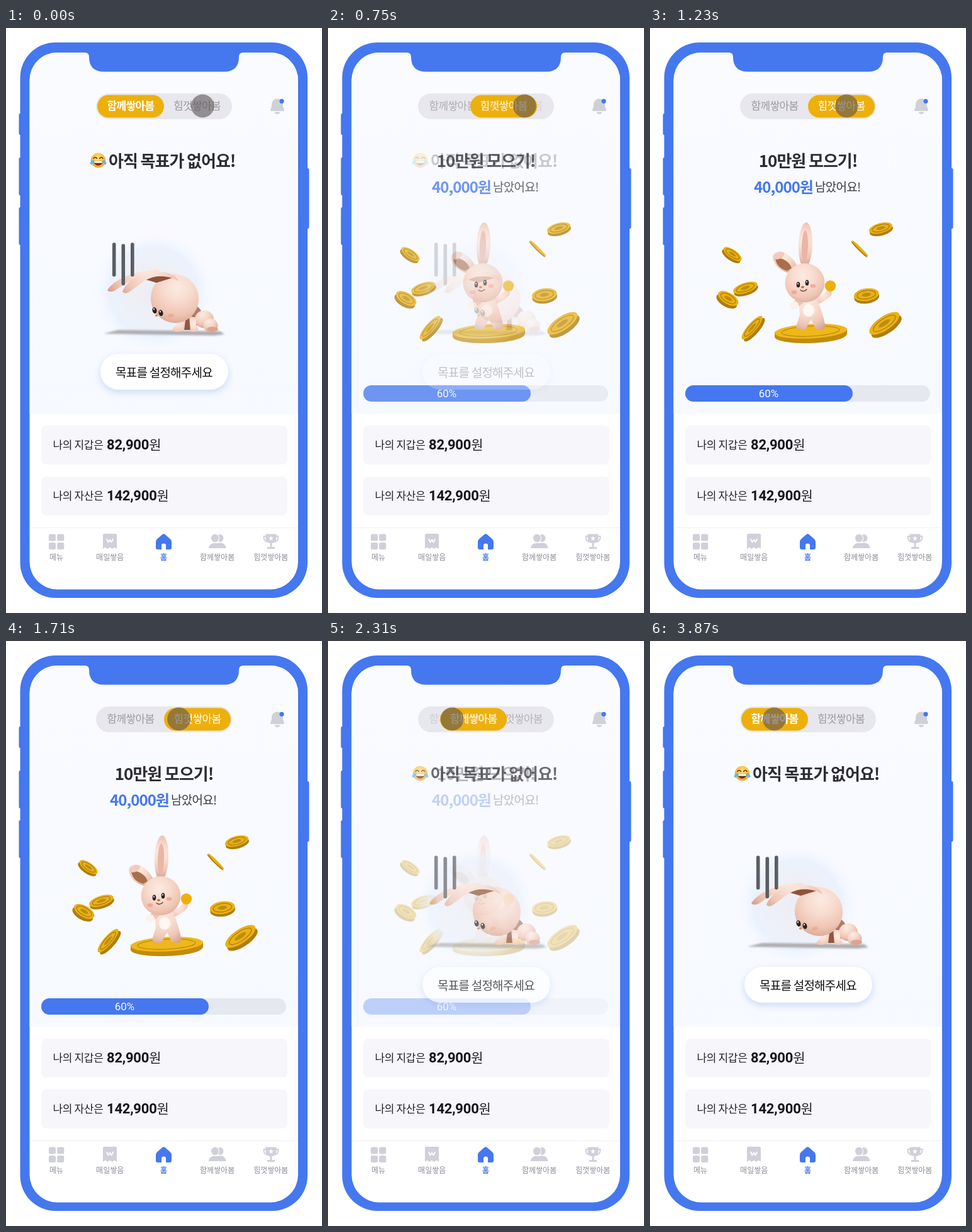
An HTML page with a canvas that plays this animation: 502 by 930 pixels, repeating every 3.9 s.

```html
<!DOCTYPE html>
<html lang="ko">
<head>
<meta charset="utf-8">
<title>저축 목표 화면</title>
<style>
html, body { margin: 0; width: 100%; height: 100%; overflow: hidden; background: #fff; }
canvas { display: block; width: 502px; height: 930px; }
</style>
</head>
<body>
<canvas id="stage"></canvas>
<script>
const W = 502, H = 930, LOOP = 3900;
const BLUE = '#4577ef', GOLD = '#edb00b', INK = '#2d2c33', GREY = '#9a9aa2', ICON = '#cfd0d9';
const KR = '"Noto Sans CJK KR", "Noto Sans CJK", "Noto Sans", sans-serif';
const NUM = 'Roboto, "Noto Sans CJK KR", sans-serif';
const TABS = ['함께쌓아봄', '힘껏쌓아봄'];
const dpr = window.devicePixelRatio || 1;

function setup(canvas) {
  canvas.width = W * dpr;
  canvas.height = H * dpr;
  const ctx = canvas.getContext('2d');
  ctx.scale(dpr, dpr);
  return ctx;
}

const stage = setup(document.getElementById('stage'));
let c = stage;

// Draws once into its own canvas so a whole scene can fade as one.
function layer(draw) {
  const canvas = document.createElement('canvas');
  c = setup(canvas);
  draw();
  c = stage;
  return canvas;
}

function box(x, y, w, h, r, fill) {
  c.fillStyle = fill;
  c.beginPath();
  c.roundRect(x, y, w, h, r);
  c.fill();
}

function oval(x, y, rx, ry, fill, deg = 0) {
  c.fillStyle = fill;
  c.beginPath();
  c.ellipse(x, y, rx, ry, deg * Math.PI / 180, 0, Math.PI * 2);
  c.fill();
}

function shape(d, fill) {
  c.fillStyle = fill;
  c.fill(new Path2D(d));
}

function line(d, color, width) {
  c.strokeStyle = color;
  c.lineWidth = width;
  c.lineCap = c.lineJoin = 'round';
  c.stroke(new Path2D(d));
}

function text(str, x, y, size, color, opt = {}) {
  const { weight = 400, align = 'left', track = -0.04, font = KR } = opt;
  c.font = `${weight} ${size}px ${font}`;
  c.letterSpacing = `${size * track}px`;
  c.textAlign = align;
  c.textBaseline = 'alphabetic';
  c.fillStyle = color;
  c.fillText(str, x, y);
}

function glow(x, y, r, ...stops) {
  const g = c.createRadialGradient(x, y, 0, x, y, r);
  stops.forEach((s, i) => g.addColorStop(i / (stops.length - 1), s));
  return g;
}

const skin = (x, y, r) => glow(x, y, r, '#fceae1', '#f8dccf', '#efc5b4', '#cf9a85');

function coin(x, y, rx, ry, deg, depth) {
  c.save();
  c.translate(x, y);
  c.rotate(deg * Math.PI / 180);
  oval(0, depth / 2, rx, ry, '#b07c0a');
  oval(0, -depth / 2, rx, ry, '#e9b114');
  if (ry > 4) {
    c.strokeStyle = '#a9790f';
    c.lineWidth = 1.2;
    c.beginPath();
    c.ellipse(0, -depth / 2, rx * .74, ry * .67, 0, 0, Math.PI * 2);
    c.stroke();
    oval(0, -depth / 2, rx * .38, ry * .3, '#bf8c10');
  }
  c.restore();
}

function laughFace(x, y) {
  oval(x, y, 11.8, 11.8, glow(x, y - 3, 15, '#ffe17a', '#fbc84a', '#ee9f30'));
  shape(`M${x - 7.5} ${y + 1} H${x + 7.5} C${x + 7} ${y + 10.5} ${x - 7} ${y + 10.5} ${x - 7.5} ${y + 1}Z`, '#6b3418');
  box(x - 6.5, y + 1, 13, 3, 1, '#fff');
  for (const s of [-1, 1]) {
    line(`M${x + s * 7.5} ${y - 3} Q${x + s * 5} ${y - 7} ${x + s * 2} ${y - 3}`, '#6b3418', 1.5);
    oval(x + s * 9.8, y + 3, 2.3, 4, '#5cbcec', s * -35);
  }
}

function sadRabbit() {
  oval(234, 419, 95, 89, glow(234, 419, 95, '#ececf2', '#eeeff5', '#eef0f7', '#ebf2fd', 'rgba(246,249,255,0)'));
  c.save();
  c.filter = 'blur(1.5px)';
  shape('M155 486 L178 480 L340 482 L347 487 L330 489Z', '#aeadb1');
  c.restore();

  // far ear and hind body
  shape('M161 417 C169 402 202 384 244 385 L238 393 C212 391 192 405 172 418 Q164 421 161 417Z', skin(222, 380, 75));
  oval(294, 458, 18, 18, '#b47b64');
  oval(315, 463, 15, 14, skin(312, 455, 24));
  oval(325, 473, 11.5, 11, skin(322, 466, 20));
  oval(328, 479, 9, 4, '#d9a591');

  // legs, with the shaded gap between them
  shape('M278 458 H300 L298 480 H282Z', '#8f5743');
  shape('M270 456 L286 458 L283 480 Q275 485 264 482 Q265 476 271 472Z', skin(273, 468, 23));
  shape('M291 458 L303 460 Q300 472 306 479 Q302 485 293 482Z', skin(298, 470, 21));

  oval(268, 430, 38, 39, skin(272, 412, 66), -20);
  shape('M218 399 C232 387 254 389 265 397 L239 405 L229 402Z', '#8f523a');
  shape('M185 419 C191 402 216 384 252 388 C264 390 271 396 274 402 C262 395 246 393 234 396 C218 400 207 413 195 420 Q188 424 185 419Z',
    skin(228, 382, 65));
  oval(236, 449, 3.4, 5, '#28211f', -15);
  oval(246, 453, 3.4, 5, '#28211f', -15);
  oval(235, 447, 1, 1.4, '#fff');
  oval(245, 451, 1, 1.4, '#fff');
  oval(239, 457, 2.2, 1.7, '#d88a48');
  oval(262, 457, 5, 3, 'rgba(240,150,125,.5)', -10);

  line('M171.7 344 V392.5', '#5c5d62', 5.6);
  line('M186.3 346 V406.5', '#5c5d62', 5.6);
  line('M200.8 344 V392.5', '#5c5d62', 5.6);
}

function happyRabbit() {
  const coins = [
    [130, 361, 17, 7, 35, 4], [152, 415, 20, 8, -18, 4], [123, 432, 18, 9, 30, 5],
    [164, 478, 24, 7, -49, 5], [367, 320, 19, 8, -15, 4], [333, 351, 18, 2, 45, 2],
    [344, 426, 20, 10, -8, 4], [374, 472, 28, 11, -34, 6]
  ];
  coins.forEach(k => coin(...k));

  shape('M198 483 V491 C200 506 311 504 313 486 V478Z', '#c38b08');
  oval(255.5, 482, 57.5, 11.5, '#eeb71a', -3);
  c.strokeStyle = '#b5820e';
  c.lineWidth = 1.2;
  c.beginPath();
  c.ellipse(255, 482, 46, 8, -.05, 0, Math.PI * 2);
  c.stroke();

  oval(247, 345, 11, 36, skin(244, 338, 42), 2);
  oval(246, 347, 5, 25, '#eab5a6', 2);
  shape('M196 369 C192 358 204 352 213 357 C224 363 232 371 235 382 L218 389 C206 385 199 378 196 369Z', skin(213, 362, 32));
  shape('M199 367 C208 363 222 371 225 382 L218 386 C208 384 201 377 199 367Z', '#a86f4b');
  oval(205, 362, 9, 5, '#f3cabb', -25);

  shape('M260 428 Q276 426 284 414 Q291 417 288 425 Q278 435 264 440Z', skin(274, 424, 22));
  oval(286.5, 410, 8.7, 8.7, GOLD);
  shape('M236 432 Q252 426 266 432 Q274 452 279 475 Q273 483 263 478 L256 463 L247 479 Q237 483 232 475 L238 456Z', skin(250, 440, 48));
  oval(252, 449, 9, 10, '#fff7f3');
  oval(236, 436, 9, 5.5, '#efc2b3', -25);
  oval(229, 441, 7, 6.5, '#fdf1ec');
  oval(246, 405, 31.5, 31, skin(243, 394, 52), -8);
  oval(235.5, 408, 2.8, 4.5, '#2a2220');
  oval(249.5, 405, 2.8, 4.5, '#2a2220');
  oval(235, 406.5, .9, 1.2, '#fff');
  oval(249, 403.5, .9, 1.2, '#fff');
  oval(242.5, 412, 2.5, 1.7, '#b66c35');
  line('M239 416.5 Q244 421 249 415.5', '#6b3e30', 1.3);
  oval(229, 420, 4.5, 3, 'rgba(240,145,130,.6)');
  oval(259, 410, 4.5, 3, 'rgba(240,145,130,.6)');
}

function emptyGoal() {
  laughFace(146.5, 210.5);
  text('아직 목표가 없어요!', 163, 221, 26, INK, { weight: 700 });
  sadRabbit();
  c.save();
  c.shadowColor = 'rgba(85,135,235,.28)';
  c.shadowBlur = 11 * dpr;
  c.shadowOffsetY = 4 * dpr;
  box(150, 518, 203, 57, 28.5, '#fff');
  c.restore();
  text('목표를 설정해주세요', 251, 555, 19, '#101014', { weight: 500, align: 'center' });
}

function activeGoal() {
  text('10만원 모으기!', 251, 221, 26, INK, { weight: 700, align: 'center' });
  text('40,000원', 165, 262, 24, BLUE, { weight: 700 });
  text('남았어요!', 262, 260, 19, '#3b3a41');
  happyRabbit();
  box(56, 568, 389, 26, 13, '#e6e8ef');
  box(56, 568, 266, 26, 13, BLUE);
  text('60%', 188.5, 587, 17, '#fff', { align: 'center', font: NUM, track: 0 });
}

function amount(label, value, y) {
  box(56, y, 391, 62, 8, '#f7f6fb');
  text(label, 74.5, y + 37, 17, '#232228', { track: -.02 });
  text(value, 160, y + 38, 22, '#151519', { weight: 700, font: NUM, track: -.01 });
  text('원', 160 + c.measureText(value).width, y + 38, 21, '#232228');
}

function navBar() {
  box(39, 794, 424, 1, 0, '#f0f0f4');
  for (const x of [68, 81.3])
    for (const y of [804.5, 818]) box(x, y, 11, 11, 2.5, ICON);

  shape('M154 806 Q154 804 156 804 H174 Q176 804 176 806 V828 L172.3 825.500 L168.7 828 L165 825.500 L161.3 828 L157.7 825.500 L154 828Z', ICON);
  line('M160 812.5 L162.5 817.5 L165 813.5 L167.5 817.5 L170 812.5', '#fff', 1.8);

  shape('M248.5 805 Q250.5 803.5 252.5 805 L261 812.5 Q263 814 263 817 V826 Q263 829 260 829 H254 V822 Q254 819.5 250.5 819.5 Q247 819.5 247 822 V829 H241 Q238 829 238 826 V817 Q238 814 240 812.5Z', BLUE);

  oval(340, 811, 5.5, 6, ICON);
  shape('M336 827 V819 C346 817 349 822 349.5 827Z', ICON);
  oval(332, 811, 7, 7.3, '#fff');
  oval(332, 811, 6, 6.3, ICON);
  shape('M322 827 C322 816 342 816 342 827Z', ICON);

  line('M413 808 H409.5 Q409 816 416 817 M429 808 H432.5 Q433 816 426 817', ICON, 2);
  shape('M412.5 804.5 H429.5 V811 C429.5 822 412.5 822 412.5 811Z M419.5 818 H422.5 V825 H427 V828 H415 V825 H419.5Z', ICON);
  c.fillStyle = '#fff';
  c.beginPath();
  for (let i = 0; i < 10; i++) {
    const a = i * Math.PI / 5 - Math.PI / 2, r = i % 2 ? 1.9 : 4.2;
    c.lineTo(421 + r * Math.cos(a), 811.5 + r * Math.sin(a));
  }
  c.fill();

  ['메뉴', '매일쌓음', '홈', ...TABS].forEach((name, i) => {
    const on = i === 2;
    text(name, 80 + i * 85.2, 846, 12, on ? BLUE : '#8b8c95', { weight: on ? 700 : 500, align: 'center', track: 0 });
  });
}

function phone() {
  box(0, 0, W, H, 0, '#fff');
  for (const [y, h] of [[136, 34], [206, 60], [285, 60]]) box(20.5, y, 6, h, 2, BLUE);
  box(475, 223, 6.5, 96, 2, BLUE);
  box(22.5, 23, 456.5, 883, 56, BLUE);
  c.save();
  c.beginPath();
  c.roundRect(37.5, 39, 426.5, 853.5, 44);
  c.clip();
  box(37, 39, 427, 854, 0, '#fff');
  const sky = c.createLinearGradient(0, 39, 0, 613);
  sky.addColorStop(0, '#fafbff');
  sky.addColorStop(1, '#f6f9ff');
  box(37, 39, 427, 574, 0, sky);
  amount('나의 지갑은', '82,900', 632);
  amount('나의 자산은', '142,900', 713);
  navBar();
  c.restore();
  shape('M125 37 V39 Q132 39 132 46 Q132 69.5 156 69.5 H346 Q370 69.5 370 46 Q370 39 377 39 V37Z', BLUE);

  box(143, 104, 216, 41, 20.5, '#e7e7ed');
  shape('M431 112.5 C424 112.5 422 118 422 123 C422 127 420 128 420 131 Q420 132 422 132 H440 Q442 132 442 131 C442 128 440 127 440 123 C440 118 438 112.5 431 112.5Z M426.5 133.5 H435.5 Q434.5 137 431 137 Q427.5 137 426.5 133.5Z', '#d0d1d7');
  oval(438, 116.3, 3.6, 3.6, BLUE);
}

const base = layer(phone), empty = layer(emptyGoal), active = layer(activeGoal);

const clamp = x => Math.min(1, Math.max(0, x));
const span = (t, from, length) => clamp((t - from) / length);
const smooth = x => x * x * (3 - 2 * x);

// cubic-bezier(0, 0, .58, 1)
function easeOut(x) {
  let lo = 0, hi = 1;
  for (let i = 0; i < 20; i++) {
    const s = (lo + hi) / 2;
    if (1.74 * s * s * (1 - s) + s ** 3 < x) lo = s; else hi = s;
  }
  return lo * lo * (3 - 2 * lo);
}

function fade(alpha, draw) {
  if (alpha <= 0) return;
  c.globalAlpha = alpha;
  draw();
  c.globalAlpha = 1;
}

function tabs(p) {
  const label = (i, x, color, weight) =>
    text(TABS[i], x, 130, 17, color, { weight, align: 'center' });
  fade(p, () => label(0, 198, GREY, 400));
  fade(1 - p, () => label(1, 303.5, GREY, 400));
  const x = 145 + 106 * p;
  box(x, 106.5, 106, 36, 18, GOLD);
  fade(1 - p, () => label(0, x + 53, '#fff', 700));
  fade(p, () => label(1, x + 53, '#fff', 500));
}

function touch(t) {
  const pulse = Math.exp(-(((t - 600) / 70) ** 2)) + Math.exp(-(((t - 2165) / 70) ** 2));
  const x = 312.3 - 115 * smooth(span(t, 1575, 355));
  oval(x, 124, 18.4 + 2 * pulse, 18.4 + 2 * pulse, 'rgba(92,84,84,.6)');
}

function frame(now) {
  const t = now % LOOP;
  const p = t < 1500 ? easeOut(span(t, 560, 330)) : 1 - easeOut(span(t, 2130, 360));
  c.drawImage(base, 0, 0, W, H);
  fade(p, () => c.drawImage(active, 0, 0, W, H));
  fade(1 - p, () => c.drawImage(empty, 0, 0, W, H));
  tabs(p);
  touch(t);
  requestAnimationFrame(frame);
}
requestAnimationFrame(frame);
</script>
</body>
</html>
```
